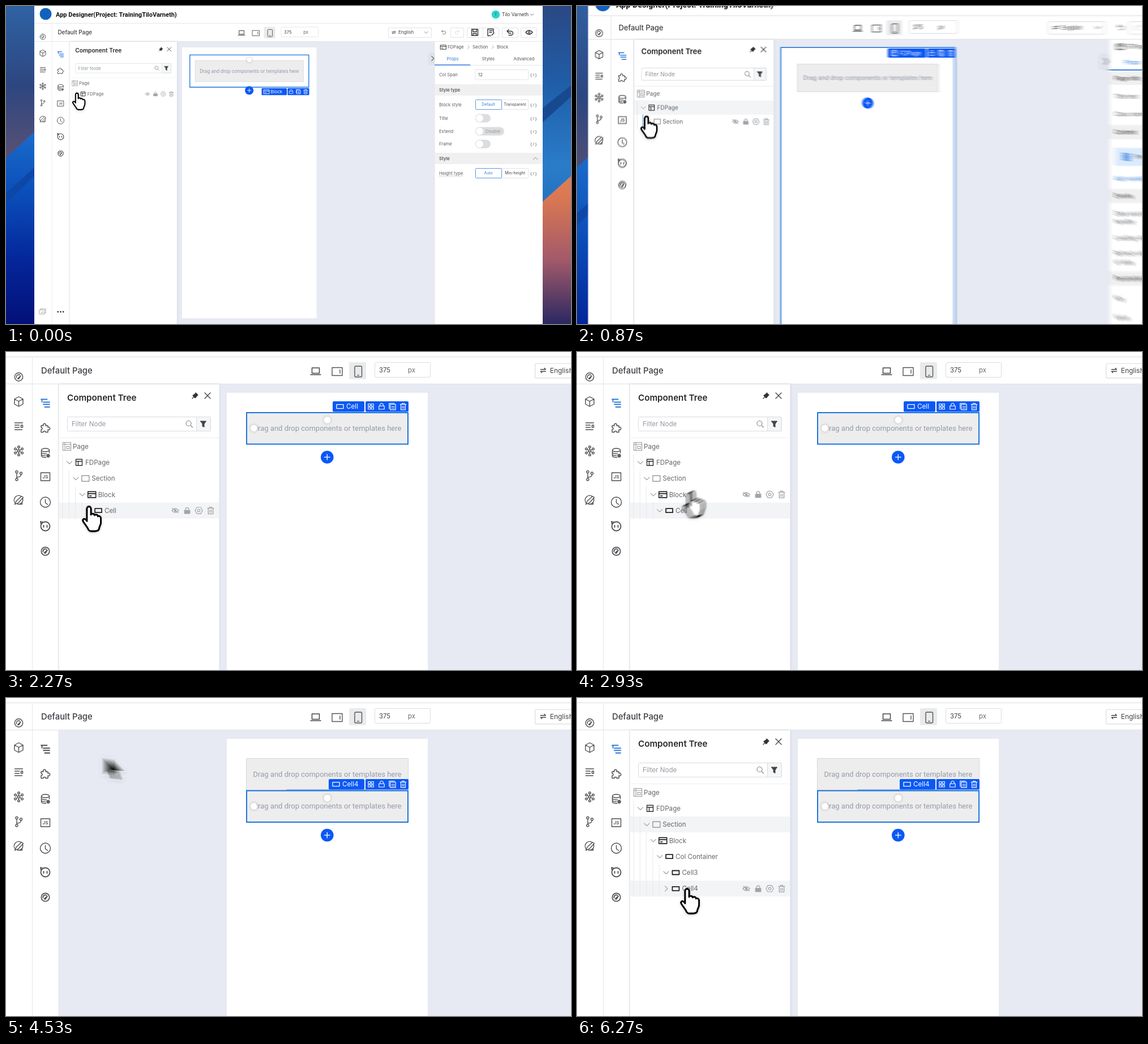
An HTML page with a canvas for the animation above (6.34 s loop, 998 by 561 pixels).

```html
<!DOCTYPE html>
<html lang="en">
<head>
<meta charset="utf-8">
<title>App Designer</title>
<style>
html, body { margin: 0; width: 100%; height: 100%; overflow: hidden; background: #fff; }
canvas { display: block; width: 998px; height: 561px; }
</style>
</head>
<body>
<canvas id="stage" width="998" height="561"></canvas>
<script>
const W = 998, H = 561, LOOP = 6340, STEP = 200 / 3;
const ZOOM = 1.494, OX = 74.6, OY = 37;
const screen2d = document.getElementById('stage').getContext('2d');
const buffer = document.createElement('canvas');
buffer.width = W; buffer.height = H;
const g = buffer.getContext('2d');

const BLUE = '#0a58f6', EDGE = '#1c74dd', LINE = '#e4e6ea', BOX = '#d9dce2', INK = '#4b4d52', GREY = '#a0a3a8';

// ---------- drawing helpers ----------
function rect(x, y, w, h, fill, stroke, lw = 1, r = 0) {
  g.beginPath();
  g.roundRect(x, y, w, h, r);
  if (fill) { g.fillStyle = fill; g.fill(); }
  if (stroke) { g.strokeStyle = stroke; g.lineWidth = lw; g.stroke(); }
}
function line(x1, y1, x2, y2, color = LINE, lw = 1, dash = []) {
  g.beginPath(); g.moveTo(x1, y1); g.lineTo(x2, y2);
  g.setLineDash(dash);
  g.strokeStyle = color; g.lineWidth = lw; g.stroke();
  g.setLineDash([]);
}
function disc(x, y, r, fill) {
  g.beginPath(); g.arc(x, y, r, 0, 7); g.fillStyle = fill; g.fill();
}
function text(s, x, y, size, color = '#5c5f66', weight = 400, align = 'left', font = 'Inter') {
  g.font = `${weight} ${size}px ${font}, sans-serif`;
  g.textAlign = align; g.fillStyle = color;
  g.fillText(s, x, y + size * 0.36);
}
function icon(d, x, y, color = INK, lw = 1.4, k = 1, filled = false) {
  g.save();
  g.translate(x, y); g.scale(k, k);
  g.lineWidth = lw; g.strokeStyle = g.fillStyle = color;
  g.lineJoin = g.lineCap = 'round';
  const p = new Path2D(d);
  if (filled) g.fill(p);
  g.stroke(p);
  g.restore();
}
const ring = (x, y, r) => `M${x - r} ${y}a${r} ${r} 0 1 0 ${2 * r} 0a${r} ${r} 0 1 0 ${-2 * r} 0`;
const box = (x, y, w, h) => `M${x} ${y}h${w}v${h}h${-w}z`;

const GAUGE = ring(0, 0, 7.2) + 'M-4 1a4 4 0 0 1 6-4.4M-2 3L3.5-2L0 3.5Z';
const CUBE = 'M0-8.5L7.5-4.5V4.5L0 8.5L-7.5 4.5V-4.5ZM-7.5-4.5L0-.5L7.5-4.5M0-.5V8.5';
const LIST = 'M-7-6H7M-7-2H1M4-2H7V2H4ZM-7 2H1M-7 6H6';
let CLUSTER = ring(0, 0, 2);
for (let a = -90; a < 270; a += 60) {
  const c = Math.cos(a * Math.PI / 180), s = Math.sin(a * Math.PI / 180);
  CLUSTER += `M${c * 2} ${s * 2}L${c * 5} ${s * 5}` + ring(c * 7, s * 7, 1.8);
}
const BRANCH = ring(-3.5, -6.5, 2) + ring(4, -4, 2) + ring(-3.5, 7, 2) + 'M-3.5-4.5V5M-3.5 3Q4 3 4-2';
const PEN = 'M-7 4a8 8 0 0 1 11-11M7-3a8 8 0 0 1-9 10M-7 7L-4 1L5-7L8-5L-1 5ZM2 7H6V3';
const TREE = 'M-7.5-6.5H3M-3.5-1.5H7.5M-3.5 2.5H7.5M-1 7H7.5M-6-6V-2';
const PUZZLE = 'M-7-4H-3a2.4 2.4 0 1 1 4 0H5V-1a2.4 2.4 0 1 1 0 4V7.5H1a2 2 0 1 0-4 0H-7V3a2 2 0 1 0 0-4Z';
const DB = 'M-7-5a7 3 0 0 1 14 0a7 3 0 0 1-14 0V5a7 3 0 0 0 8 3M7-5V0M-7-1a7 3 0 0 0 9 2.5M-7 2.5a7 3 0 0 0 7 2.5' + ring(5, 5, 2.6) + ring(5, 5, 1);
const CLOCK = ring(0, 0, 9) + 'M0-5V1L4 4';
const FACE = ring(0, 0.5, 8) + 'M-4-6.5L-8.5-8L-7.5-3M-3-1V2M3-1V2';

const SEARCH = ring(-1, -1, 4.5) + 'M2.5 2.5L6 6';
const FUNNEL = 'M-5-5H5L1.5 0V5.5L-1.5 4V0Z';
const PIN = 'M1-5L5-1L3.5 0L1 3.5L0 4L-4 0L-3-1L.5-3.5ZM-2 2L-5 5';
const CROSS = 'M-5-5L5 5M5-5L-5 5';
const EYE = 'M-6 0Q0-7 6 0Q0 7-6 0' + ring(0, 0, 1.6);
const EYE_OFF = EYE + 'M-5-4L5 4';
const LOCK = box(-5, -1, 10, 6) + 'M-3-1V-3a3 3 0 0 1 6 0V-1';
const HEX = 'M-3.3-5.7H3.3L6.6 0L3.3 5.7H-3.3L-6.6 0Z' + ring(0, 0, 2.2);
const TRASH = 'M-5.5-4H5.5M-2-4V-6H2V-4M-4.2-4V6H4.2V-4M-1.4-1V3.5M1.4-1V3.5';
const COPY = box(-4, -4, 10, 10) + 'M-6 4V-6H4M-1.5 0H4M-1.5 3H4';
const GRID = box(-5, -5, 4, 4) + box(1, -5, 4, 4) + box(-5, 1, 4, 4) + box(1, 1, 4, 4);
const DOWN = 'M-4.5-2L0 2.5L4.5-2', RIGHT = 'M-2-4.5L2.5 0L-2 4.5', UP = 'M-4.5 2L0-2.5L4.5 2';
const SWAP = 'M-4-1.5H4L2-3.5M4 1.5H-4L-2 3.5';
const BACK = 'M-5-2H2a3.5 3.5 0 0 1 0 7H-2M-2-5L-5-2L-2 1';
const SAVE = box(-5.5, -5.5, 11, 11) + 'M-3-5V-1H3V-5M-3 5.5V2H3V5.5';
const NOTE = 'M5 0V-6H-5V6H0M-2-3H3M-2 0H2M2 5L6 1';

const KIND = {
  FDPage: [box(-5.5, -5.5, 11, 11) + 'M-5.5-2H5.5M-1.5-2V5.5', '#333', 1.4],
  Section: [box(-6.5, -5, 13, 10), '#888', 1.2],
  Block: [box(-7, -5, 14, 10.5) + 'M-7-1.5H7M-4 2.5H-1', '#222', 1.6],
  Cell: [box(-6, -3.5, 12, 7), '#222', 1.8]
};
const kindOf = name => KIND[name] || KIND.Cell;

// ---------- time ----------
const ease = x => x <= 0 ? 0 : x >= 1 ? 1 : x < 0.5 ? 4 * x ** 3 : 1 - 4 * (1 - x) ** 3;
function zoomAt(t) {
  const a = Math.max(0, t - 650) * 0.0095;
  return 1 - (1 + a) * Math.exp(-a);
}
// [start, end, x, y]
const MOVES = [
  [470, 850, 119, 213], [1120, 1390, 130, 249], [1750, 2050, 147, 273], [2700, 3350, 443, 136],
  [4184, 4784, 69, 90], [4900, 5090, 112, 194], [5150, 5280, 123, 222], [5330, 5460, 135, 250],
  [5520, 5650, 146, 278], [5710, 5830, 157, 306], [5890, 6040, 195, 337]
];
function cursorAt(t) {
  let x = 113, y = 193;
  for (const [a, b, nx, ny] of MOVES) {
    const e = ease((t - a) / (b - a));
    x += (nx - x) * e; y += (ny - y) * e;
  }
  return { x, y };
}
const STATES = [
  [0, { shown: 2, sel: 'Block', lit: [], panel: true }],
  [430, { shown: 3, sel: 'FDPage', lit: [1] }],
  [1090, { shown: 4, sel: 'Section', lit: [2] }],
  [1690, { shown: 5, sel: 'Block', lit: [3] }],
  [2190, { sel: 'Cell', lit: [4], leaf: true }],
  [3700, { sel: 'Cell4', lit: [], split: true, panel: false, leaf: false }],
  [4830, { panel: true, shown: 2 }],
  [5120, { shown: 3 }], [5300, { shown: 4, lit: [2] }], [5490, { shown: 5 }],
  [5680, { shown: 7 }], [5860, { leaf: true }], [6000, { lit: [2, 6] }]
];
const stateAt = t => Object.assign({}, ...STATES.filter(s => s[0] <= t).map(s => s[1]));

// ---------- parts in screen units at full view ----------
function wallpaper() {
  const fade = stops => {
    const f = g.createLinearGradient(0, 0, 0, H);
    stops.forEach((c, i) => f.addColorStop(i / (stops.length - 1), c));
    return f;
  };
  const slab = (pts, fill) => {
    g.beginPath(); pts.forEach(p => g.lineTo(...p)); g.fillStyle = fill; g.fill();
  };
  rect(0, 0, 50, H, fade(['#2f62a4', '#2d4680', '#5d5273', '#d98463', '#d27350']));
  slab([[0, 268], [50, 222], [50, H], [0, H]], fade(['#1f72cf', '#1f72cf', '#1a6bcb', '#0a4cb8', '#04269a', '#031078']));
  slab([[0, 330], [50, 285], [50, 300], [0, 348]], '#0d47a8');
  rect(948, 0, 50, H, fade(['#2b4884', '#1f5ea9', '#2a7cc9', '#1c64b4', '#1a4f9c']));
  slab([[948, 180], [998, 140], [998, 160], [948, 205]], '#17498f');
  slab([[948, 345], [998, 300], [998, H], [948, H]], fade(['#e08a64', '#e08a64', '#e08a64', '#db7852', '#a2596a', '#2a2862']));
}
function header() {
  disc(70, 14, 10.5, '#1262bd');
  text('App Designer(Project: TrainingTiloVarneth)', 88, 15.5, 11, '#111', 700, 'left', 'Roboto');
  disc(865, 15, 7.3, '#2fd3cf');
  text('T', 865, 15.3, 7, '#14636a', 400, 'center');
  text('Tilo Varneth', 876, 15, 8.3, '#333');
  icon(DOWN, 929, 15, '#555', 1.4, 0.6);
  line(50, 30.5, 948, 30.5); line(50, 62.5, 948, 62.5);
  rect(675.5, 38.5, 76, 17, '#fff', BOX, 0.8, 1.5);
  icon(SWAP, 685, 46.5, '#444', 1.3, 0.75);
  text('English', 693, 46.5, 8, '#444');
  icon(DOWN, 742, 46.5, '#888', 1.3, 0.7);
  icon(BACK, 773, 46, '#777', 1.3, 0.7);
  for (const [x, w] of [[785.5, 23], [814.5, 56], [876.5, 28], [909.5, 28]]) rect(x, 38.5, w, 17, null, BOX, 0.8, 1.5);
  line(842.5, 38.5, 842.5, 55.5, BOX, 0.8);
  g.save(); g.translate(797, 46); g.scale(-1, 1); icon(BACK, 0, 0, '#ddd', 1.3, 0.7); g.restore();
  icon(SAVE, 828, 46.5, '#333', 1.4);
  icon(NOTE, 856, 46.5, '#333', 1.4);
  icon(BACK + 'M-2 1.5H2', 890, 46.5, '#333', 1.4);
  icon(EYE, 924, 46.5, '#333', 1.3);
}
function band(y, h, label) {
  rect(757, y, 191, h, '#f0f0f1');
  text(label, 765, y + h / 2, 7.7, '#444', 500);
}
function choice(y, a, b) {
  rect(875.5, y - 8.5, 47, 17, '#fff', BOX, 0.8, 1);
  rect(829.5, y - 8.5, 46, 17, '#fff', '#5a95de', 1, 1);
  text(a, 852, y, 6.9, '#2f7be0', 400, 'center');
  text(b, 899, y, 6.9, '#444', 400, 'center');
}
function toggle(y, label) {
  rect(829, y - 7.5, label ? 51 : 27, 15, '#dcdde0', null, 1, 7.5);
  disc(836.5, y, 6.4, '#fff');
  if (label) text(label, 847, y, 7.6, '#999');
}
function props(sel) {
  rect(757, 63, 191, 498, '#fff');
  line(757, 63, 757, 561);
  rect(745.5, 82, 12, 22, '#dfe2e9', null, 1, 3);
  icon(RIGHT, 753.5, 92.5, '#666', 1.3, 0.9);
  icon(KIND.Block[0], 772.5, 72.5, '#333', 1.4, 0.7);
  const trail = sel === 'Block' ? [['FDPage', 780], ['Section', 824], ['Block', 867]] : [['FDPage', 780]];
  trail.forEach(([s, x], i) => {
    text(s, x, 72.5, 7.7, '#555');
    if (i) icon(RIGHT, x - 7, 72.5, '#888', 1.2, 0.6);
  });
  text('Props', 789, 93.5, 7.7, '#2f7be0', 400, 'center');
  text('Styles', 852, 93.5, 7.7, '#555', 400, 'center');
  text('Advanced', 915, 93.5, 7.7, '#555', 400, 'center');
  line(757, 104.5, 948, 104.5);
  line(757, 104, 820, 104, '#2f7be0', 1.4);
  if (sel !== 'Block') {
    band(107, 17, 'Page info'); band(179, 19, 'Content'); band(266, 18, 'Events'); band(378, 18, 'Parameters');
    [['Title text', 140], ['Class name', 164], ['Data source', 299], ['handler', 310], ['Loading state', 332],
     ['Refresh rate', 353], ['of data', 365], ['Key', 414], ['Value', 440]].forEach(r => text(r[0], 765, r[1], 7.7));
    rect(765, 210, 175, 24, '#dcebfc');
    icon(GRID, 781, 222, '#2f7be0', 1.3, 0.9);
    text('Preview', 792, 222, 7.7);
    text('Add variable', 765, 251.5, 7.7, '#2f7be0');
    return;
  }
  [['Col Span', 121], ['Block style', 174], ['Title', 198], ['Extend', 221], ['Frame', 243.5], ['Height type', 295]].forEach(([s, y]) => {
    text(s, 765, y, 7.7);
    text('{/}', 925.5, y, 7, '#555', 400, 'left', 'Noto Sans Mono');
  });
  line(765, 300, 807, 300, '#888', 0.8, [1, 1]);
  rect(829, 112.5, 93.5, 17.5, '#fff', BOX, 0.8, 1);
  text('12', 834, 121, 7.7, '#444');
  band(138, 20, 'Style type');
  choice(174, 'Default', 'Transparent');
  toggle(198); toggle(221, 'Disable'); toggle(243.5);
  band(259, 20, 'Style');
  icon(UP, 935, 269, '#888', 1.2, 0.8);
  choice(295, 'Auto', 'Min-height');
}

// ---------- parts in zoomed units ----------
function rails(panel) {
  line(46.5, 9, 46.5, 810); line(93, 56, 93, 810);
  [GAUGE, CUBE, LIST, CLUSTER, BRANCH, PEN].forEach((d, i) => icon(d, 22.5, 44 + 43.5 * i));
  icon(TREE, 69.5, 90, panel ? '#2a78dd' : INK, 1.8);
  icon(PUZZLE, 69, 134); icon(DB, 69.5, 178);
  icon(box(-8, -7, 16, 14), 69.5, 220);
  text('JS', 69.5, 220.5, 8, INK, 600, 'center');
  icon(CLOCK, 69.5, 265); icon(FACE, 69.5, 307, INK, 1.8); icon(GAUGE, 69.5, 351.5, INK, 1.7);
  icon(box(-8, -4, 13, 11) + 'M-5-4V-7H8V4H5', 22, 768, '#999', 1.2);
  text('JP', 20.5, 770, 6, '#999', 600, 'center');
  for (const x of [-7, 0, 7]) disc(69.5 + x, 769, 2.1, '#444');
}
function toolbar() {
  text('Default Page', 62, 33, 14.8, '#3c3e43', 500);
  icon(box(-6.5, -6, 13, 9.5) + 'M-9 6H9', 547, 34, '#444', 1.5);
  icon(box(-9, -7, 18, 14) + 'M5-3V3', 585, 34.5, '#555', 1.4);
  rect(606, 18, 30, 30, '#e9eaec', null, 1, 2);
  rect(616, 25, 12.5, 19, null, '#555', 1.4, 2);
  line(620, 41, 624, 41, '#555', 1.3);
  rect(651.5, 18.5, 98, 26, '#fff', BOX, 1, 2);
  text('375', 659, 31.5, 11.3, '#444');
  text('px', 710, 31.5, 11.3, '#666');
}
function dropArea(y) {
  rect(424.5, y, 286, 56, '#ededee', '#d6d7d9', 1);
  text('Drag and drop components or templates here', 567.5, y + 27.5, 13, '#949ba6', 400, 'center', 'Roboto');
}
function knob(x, y) {
  g.save();
  g.shadowColor = 'rgba(0,0,0,.25)'; g.shadowBlur = 4;
  disc(x, y, 6, '#fff');
  g.restore();
}
// box x, y, w, h, then tag x, y
const FRAMES = {
  FDPage: [391, 73, 353, 713, 608, 75], Section: [391, 73, 353, 123.5, 609, 198], Block: [410.5, 92, 314, 85, 600, 179.5],
  Cell: [425, 107, 285, 55.5, 577, 87], Cell4: [425, 163.5, 285, 55.5, 570, 143]
};
function designPage(st, hot) {
  rect(390, 72, 355, 714, '#fff');
  dropArea(106.5);
  if (st.split) dropArea(163);
  const py = st.split ? 242 : 185.5;
  disc(567.3, py, 11.3, BLUE);
  line(562, py, 572.6, py, '#fff', 1.3); line(567.3, py - 5.3, 567.3, py + 5.3, '#fff', 1.3);
  if (st.split) rect(495, 161, 143, 3, '#8fb4e6', null, 1, 1.5);

  const [x, y, w, h, tx, ty] = FRAMES[st.sel];
  rect(x, y, w, h, null, EDGE, 2);
  const cell = st.sel.startsWith('Cell');
  if (st.sel === 'Block') knob(567.5, 105);
  if (cell) {
    knob(567.5, y + 13);
    if (hot) {
      line(426, 135, 709, 135, EDGE, 1.2, [2, 1]);
      disc(443, 134.5, 11, BLUE);
      icon(ring(-3, -3, 2) + ring(-3, 3, 2) + 'M-1-2L5 3M-1 2L5-3', 443, 134.5, '#fff', 1.2);
    } else knob(438, y + 27.5);
  }
  const tools = cell ? [GRID, LOCK, COPY, TRASH] : [LOCK, COPY, TRASH];
  const right = x + w + 1, left = right - 19 * tools.length;
  rect(tx, ty, left - 2 - tx, 18.5, BLUE, null, 1, 2);
  rect(left, ty, right - left, 18.5, BLUE, null, 1, 2);
  icon(kindOf(st.sel)[0], tx + 13, ty + 9.2, '#fff', 1.3);
  text(st.sel, tx + 24, ty + 9.2, 11.7, '#fff');
  tools.forEach((d, i) => icon(d, left + 9.5 + 19 * i, ty + 9.2, '#fff', 1.2, 0.95));
}
function treePanel(st, cur) {
  g.save();
  g.shadowColor = 'rgba(60,70,100,.18)'; g.shadowBlur = 4;
  rect(93.5, 57, 283, 760, '#fff');
  g.restore();
  text('Component Tree', 108, 80.5, 15.2, '#26282c', 600);
  icon(PIN, 334, 77, '#333', 1.2, 1, true);
  icon(CROSS, 356, 77, '#444', 1.4);
  rect(108.5, 114.5, 252.5, 25, '#fff', BOX, 1, 2);
  rect(336.5, 114.5, 24.5, 25, '#f5f6f7', BOX);
  text('Filter Node', 116, 127, 11.6, '#94979d');
  icon(SEARCH, 323.5, 127, '#888', 1.2);
  icon(FUNNEL, 348.5, 127, '#444', 1, 1, true);
  line(94, 151.5, 376, 151.5, '#eceef0');

  const names = ['Page', 'FDPage', 'Section', 'Block', ...(st.split ? ['Col Container', 'Cell3', 'Cell4'] : ['Cell'])].slice(0, st.shown);
  const inside = cur.x > 94 && cur.x < 376;
  const hover = inside ? Math.round((cur.y - 166.5) / 28.3) : -1;
  names.forEach((name, i) => {
    const y = 166.5 + 28.3 * i, lit = st.lit.includes(i);
    if (lit) rect(94, y - 14, 282, 28, '#f3f4f6');
    if (!i) {
      icon(box(-7, -7, 14, 14) + 'M-7-3.5H7M-3.5-7V7' + box(-0.5, 0, 5, 4), 107.5, y, '#999', 1.1);
      text(name, 118, y, 11.6, '#666');
      return;
    }
    const level = Math.min(i - 1, 4), x = 112 + 11.35 * level;
    for (let j = 0; j <= level; j++) {
      const on = j === level && i === hover && st.lit.includes(i - 1);
      line(100 + 11.3 * j, y - 14, 100 + 11.3 * j, y + 14, on ? '#3d8ae6' : '#e6e8ec');
    }
    const open = i < names.length - 1 && !(name === 'Cell3' && !st.leaf) || st.leaf && name === 'Cell';
    icon(open ? DOWN : RIGHT, x, y, '#999', 1.1);
    const [d, color, lw] = kindOf(name);
    icon(d, x + 17, y, color, lw);
    text(name, x + 28, y, 11.6, '#63666c');
    if (i === hover) {
      icon(i === 1 ? EYE : EYE_OFF, 299, y, GREY, 1.3);
      icon(LOCK, 320, y + 0.5, GREY, 1.3, 0.95);
      rect(315.5, y - 0.5, 9, 6, GREY);
      icon(HEX, 340.5, y, GREY, 1.2);
      icon(TRASH, 361.5, y, GREY, 1.3);
    }
  });
}
const HAND = new Path2D('M-4 3.5C-4-1.5 3-1.5 3 3.5V14C4 11.5 9 12 9.3 15C11 13 15 14 15.3 17C17 15.5 20.5 17 20.5 20.5V28C20.5 32 18 34 17.5 38C17 42 14 43 10 43H3C-1 43-1.5 40-3 37L-10 27C-13 22.5-9 19.5-6 23L-4 25.5Z');
const ARROW = new Path2D('M0 0V35L8 27.5L14 42L20 39L14.5 25.5H25Z');
function cursor(c, hand, k) {
  g.save();
  g.translate(c.x, c.y); g.scale(k, k);
  g.lineJoin = 'round';
  g.lineWidth = hand ? 2.8 : 2;
  g.fillStyle = hand ? '#fff' : '#000';
  g.strokeStyle = hand ? '#000' : '#fff';
  g.shadowColor = 'rgba(0,0,0,.3)'; g.shadowBlur = 4; g.shadowOffsetY = 1;
  const p = hand ? HAND : ARROW;
  g.stroke(p);
  g.shadowColor = 'transparent';
  g.fill(p); g.stroke(p);
  g.restore();
}

// ---------- whole picture ----------
function scene(t, st, press) {
  const p = zoomAt(t), s = 1 + (ZOOM - 1) * p, k = s / ZOOM, cur = cursorAt(t);
  const world = () => g.setTransform(s, 0, 0, s, -OX * p, -OY * p);
  const zoomed = () => g.setTransform(k, 0, 0, k, OX * (k - p), OY * (k - p));
  const hot = st.sel === 'Cell' && Math.hypot(cur.x - 440, cur.y - 135) < 14;
  world();
  wallpaper();
  rect(50, 0, 898, H, '#fff');
  rect(112, 62.5, 836, 498.5, '#e7eaf3');
  header();
  props(st.sel);
  zoomed();
  rails(st.panel);
  toolbar();
  designPage(st, hot);
  if (st.panel) treePanel(st, cur);
  cursor(cur, hot || cur.x < (st.panel ? 377 : 93), press);
}
function render(t) {
  const st = stateAt(t), shutter = 15;
  const a = t - shutter / 2, b = t + shutter / 2, ca = cursorAt(a), cb = cursorAt(b);
  const moving = Math.abs(zoomAt(b) - zoomAt(a)) > 0.002 || Math.hypot(cb.x - ca.x, cb.y - ca.y) > 1;
  const n = moving ? 9 : 1;
  const d = Math.abs(t - 3600);
  const press = 1 - 0.18 * ease(1 - (d - 40) / 90);
  for (let i = 0; i < n; i++) {
    scene(n > 1 ? a + shutter * i / (n - 1) : t, st, press);
    screen2d.globalAlpha = 1 / (i + 1);
    screen2d.drawImage(buffer, 0, 0);
  }
}

let start = null, last = -1;
function tick(now) {
  if (start === null) start = now;
  const t = (now - start) % LOOP;
  const n = Math.min(94, Math.floor((t + 5) / STEP));
  if (n !== last) { last = n; render(n * STEP); }
  requestAnimationFrame(tick);
}
requestAnimationFrame(tick);
</script>
</body>
</html>
```
